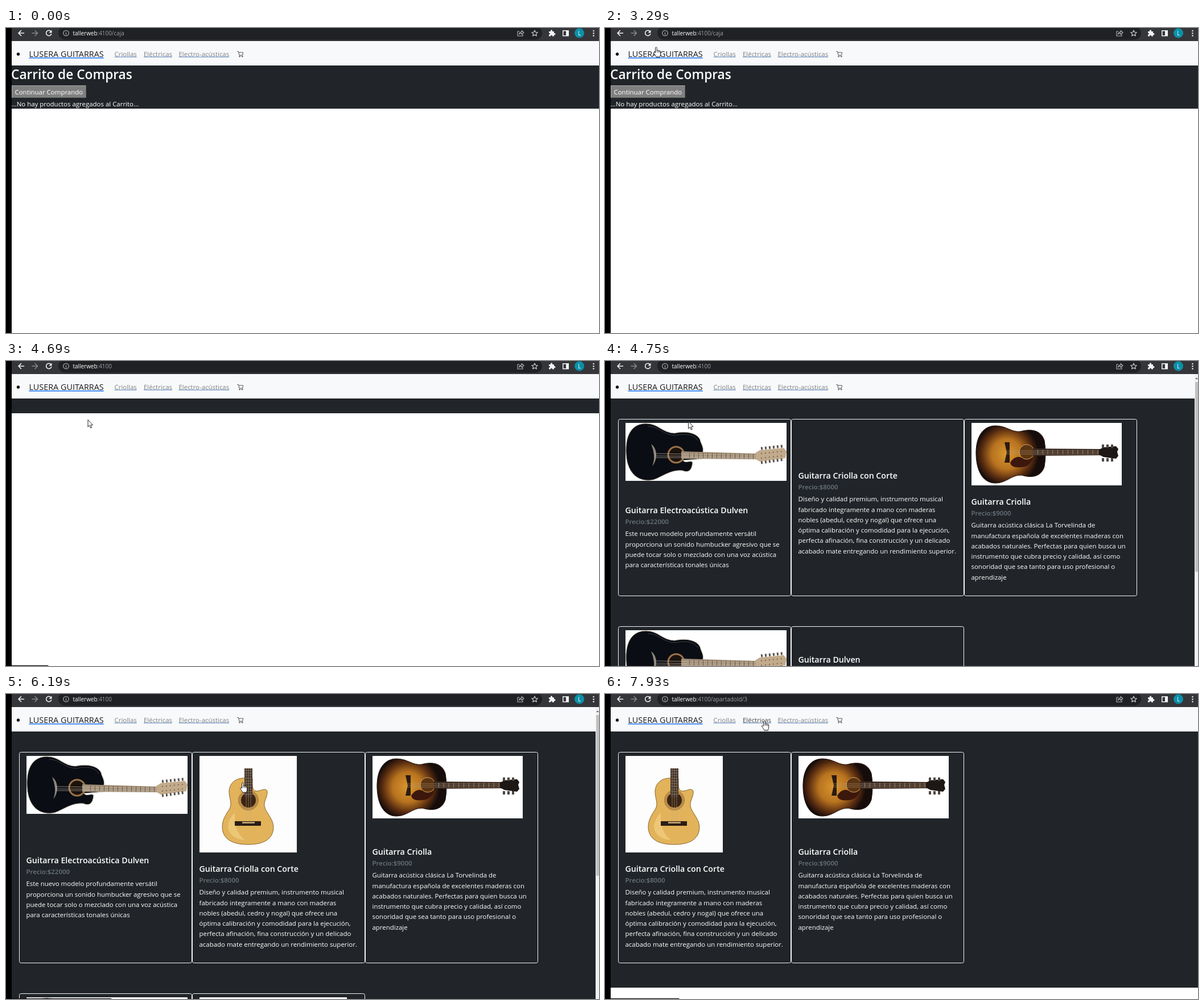
These frames come from a looping animation (1042 px wide and 537 px high, 8000 ms). An HTML page:

```html
<!DOCTYPE html>
<html lang="es">
<head>
<meta charset="utf-8">
<title>Carrito de compras</title>
<style>
html, body { margin: 0; width: 100%; height: 100%; overflow: hidden; background: #fff; }
svg { display: block; width: 100vw; height: 100vh; }
text { font: 11.44px "Open Sans", "Noto Sans", sans-serif; fill: #fff; white-space: pre; }
.url { font-size: 9.94px; }
.url tspan { fill: #9aa0a6; }
.brand { font-size: 14.4px; fill: #0d6efd; text-decoration: underline; }
.brand tspan { fill: #1a1c1e; }
.link { fill: #6d8fc4; text-decoration: underline; }
.link tspan { fill: #7f8184; }
.h2 { font-size: 22.7px; font-weight: 600; }
.h5 { font-size: 14.2px; font-weight: 600; }
.h6 { font-weight: 600; fill: #6c757d; }
.dark { fill: #212529; }
.line { fill: none; stroke-linecap: round; stroke-linejoin: round; }

/* One shared 8 s clock; 1% = 80 ms */
.a { animation: 8s step-end -2ms infinite; }
#cart, #urlCart { animation-name: cart; }
#wait { animation-name: wait; }
#homeA { animation-name: homeA; }
#homeB { animation-name: homeB; }
#bar { animation-name: bar; }
#category { animation-name: category; }
#urlHome { animation-name: urlHome; }
#urlCategory { animation-name: urlCategory; }
#brand { animation-name: brand; }
#criollas tspan { animation: criollas 8s step-end -2ms infinite; }
#electricas tspan { animation: electricas 8s step-end -2ms infinite; }
#status { animation-name: status; }
#cursor { animation-name: cursor; }
#arrow { animation-name: arrow; }
#hand { animation-name: hand; }

@keyframes cart { 0% { opacity: 1 } 46.125%, 100% { opacity: 0 } }
@keyframes wait { 0%, 59.375%, 100% { opacity: 0 } 46.125% { opacity: 1 } }
@keyframes homeA { 0%, 61.125%, 100% { opacity: 0 } 59.375% { opacity: 1 } }
@keyframes homeB { 0%, 95%, 100% { opacity: 0 } 61.125% { opacity: 1 } }
@keyframes bar { 0%, 95%, 100% { opacity: 0 } 59.375% { opacity: 1 } }
@keyframes category { 0% { opacity: 0 } 95%, 100% { opacity: 1 } }
@keyframes urlHome { 0%, 90%, 100% { opacity: 0 } 46.125% { opacity: 1 } }
@keyframes urlCategory { 0% { opacity: 0 } 90%, 100% { opacity: 1 } }
@keyframes brand { 0%, 57.75%, 100% { fill: #0d6efd } 39.5% { fill: #0a4fb8 } }
@keyframes criollas { 0%, 92.25%, 100% { fill: #7f8184 } 87.5% { fill: #45474a } }
@keyframes electricas { 0% { fill: #7f8184 } 92.25%, 100% { fill: #45474a } }
@keyframes status {
  0% { transform: translateX(-190px) }
  45.25% { transform: translateX(-111px) }
  59.375% { transform: translateX(-190px) }
  73.75% { transform: none }
  83% { transform: translateX(-22px) }
  84.875% { transform: translateX(-190px) }
  89.25%, 100% { transform: translateX(-55px) }
}
@keyframes cursor {
  0% { transform: translate(-50px, 0) }
  5.625% { transform: translate(964px, 511px); animation-timing-function: steps(7) }
  11.75% { transform: translate(9px, 212px) }
  18.375% { transform: translate(9.5px, 198px); animation-timing-function: steps(5) }
  24.25% { transform: translate(9px, 164px) }
  29.25% { transform: translate(9px, 143px); animation-timing-function: steps(4) }
  32.75% { transform: translate(9px, 58px) }
  35.25% { transform: translate(18px, 50px); animation-timing-function: steps(2) }
  37.5% { transform: translate(60px, 21px); animation-timing-function: steps(3) }
  41.125% { transform: translate(90px, 33.5px); animation-timing-function: steps(4) }
  45.25% { transform: translate(98px, 30px) }
  57.75% { transform: translate(130px, 88px) }
  58.625% { transform: translate(143.5px, 103px) }
  59.375% { transform: translate(146px, 106px) }
  61.125% { transform: translate(152px, 98px); animation-timing-function: steps(5) }
  65.625% { transform: translate(230px, 64px); animation-timing-function: steps(5) }
  70.5% { transform: translate(330px, 190px) }
  71.375% { transform: translate(346px, 198px); animation-timing-function: steps(6) }
  77.375% { transform: translate(416px, 156px) }
  80.5% { transform: translate(370px, 140px); animation-timing-function: steps(3) }
  83% { transform: translate(250px, 90px) }
  84.875% { transform: translate(238px, 78px); animation-timing-function: steps(3) }
  87.5% { transform: translate(212px, 46px) }
  91.25% { transform: translate(222px, 46px); animation-timing-function: steps(3) }
  93.875% { transform: translate(284px, 46px) }
  95.625% { transform: translate(290px, 47px) }
  99.125%, 100% { transform: translate(280px, 46.5px) }
}
@keyframes arrow {
  0%, 57.75%, 83%, 100% { opacity: 1 }
  39.5%, 71.375%, 87.5% { opacity: 0 }
  99.9% { opacity: 0 }
}
@keyframes hand {
  0%, 57.75%, 83%, 100% { opacity: 0 }
  39.5%, 71.375%, 87.5% { opacity: 1 }
  99.9% { opacity: 1 }
}
</style>
</head>
<body>
<svg viewBox="0 0 1042 537" preserveAspectRatio="none">
  <defs>
    <radialGradient id="burst" gradientUnits="userSpaceOnUse" cx="62" cy="55" r="66">
      <stop offset="0" stop-color="#d9972f"/>
      <stop offset=".4" stop-color="#b8731f"/>
      <stop offset=".68" stop-color="#552a10"/>
      <stop offset=".85" stop-color="#160c0a"/>
    </radialGradient>
    <g id="electro">
      <path fill="#fff" d="M0 0h283v102H0z"/>
      <path fill="#0b0d14" stroke="#cfc7b4" d="M1 55C-1 20 12 1 36 1C58 1 64 17 86 18C104 14 124 16 131 29C133 38 138 42 136 52V63L101 66C106 72 113 65 118 69C117 82 112 89 100 84C80 82 66 94 50 100C24 106 3 90 1 55Z"/>
      <path class="line" stroke="#3a3c44" d="M40 6C60 6 66 22 88 22C106 18 120 20 127 31"/>
      <circle cx="89" cy="56" r="14" fill="#1a120d" stroke="#9a7348" stroke-width="3"/>
      <path fill="#8d877d" d="M45 37Q54 44 54 56T47 76Q51 66 50 56T45 37Z"/>
      <path fill="#a08d76" d="M98 50L230 54V64L98 63Z"/>
      <path class="line" stroke="#d8d0c2" stroke-width=".6" d="M52 54L230 57M52 58L230 60M52 61L230 62"/>
      <path stroke="#6b5947" stroke-width="9" stroke-dasharray="1 7" d="M112 57L228 59"/>
      <path fill="#c2aa8b" d="M228 53L236 48L278 44L283 50L281 62L236 68L229 64Z"/>
      <path stroke="#5c5650" stroke-width="5" stroke-dasharray="3 4" d="M238 45L276 41M238 70L279 64"/>
      <path stroke="#77695a" stroke-width="2" stroke-dasharray="2 5" d="M238 54L276 50M238 62L276 58"/>
    </g>
    <g id="sunburst">
      <path fill="#fff" d="M0 0h264v110H0z"/>
      <path fill="url(#burst)" stroke="#1c1310" d="M8 56C7 22 22 5 42 5C62 5 70 17 86 15C104 10 122 12 128 31Q132 54 128 77C122 96 104 97 88 92C70 91 62 106 42 106C22 106 9 88 8 56Z"/>
      <path fill="#3c170c" d="M68 70Q78 54 92 63L108 62Q102 78 86 78Q70 80 68 70Z"/>
      <circle cx="97" cy="51" r="13" fill="#5a3413" stroke="#d3a45a"/>
      <path fill="#2b1a12" d="M58 34h9v36h-9l4-18z"/>
      <path fill="#3a2a22" d="M108 45L228 46V57L108 58Z"/>
      <path class="line" stroke="#b19572" stroke-width=".6" d="M62 49H228M62 52H228M62 55H228"/>
      <path stroke="#a89782" stroke-width="8" stroke-dasharray=".8 8" d="M116 51.5H226"/>
      <path fill="#1d1715" d="M224 47L232 43L254 41L258 46L256 51L258 58L254 63L232 60L224 56Z"/>
      <path stroke="#4b4541" stroke-width="6" stroke-dasharray="4 4" d="M229 41H252M229 65H252"/>
    </g>
    <g id="classic">
      <path fill="#fdfdfd" d="M0 0h171v170H0z"/>
      <path fill="#e2b35a" stroke="#8a6430" d="M79 39C64 39 53 47 52 62C52 76 58 82 53 93C46 104 40 112 40 126C41 148 60 156 85 156C111 156 129 148 130 126C130 110 116 100 114 88C113 78 120 72 119 62C116 55 108 62 100 62Q93 62 93 50V39Z"/>
      <path fill="#edc777" d="M62 100Q50 112 50 126Q54 146 80 148Q60 134 62 100Z"/>
      <circle cx="86" cy="78" r="15" fill="#3a2413" stroke="#b98a47" stroke-width="4"/>
      <circle cx="86" cy="78" r="17.5" fill="none" stroke="#5c4020" stroke-dasharray="1 1"/>
      <path fill="#40322b" d="M79 22h14v50q-7 3-14 0z"/>
      <path stroke="#8f8172" stroke-width="13" stroke-dasharray=".7 4" d="M86 25V70"/>
      <path class="line" stroke="#c8ad7d" stroke-width=".5" d="M82 22V116M86 22V116M90 22V116"/>
      <path fill="#2b1d15" d="M62 115h46v8H62z"/>
      <path fill="#b79c6d" d="M75 116h22v3H75z"/>
    </g>
    <path id="blank" fill="#fdfdfd" d="M0 0h259v100H0z"/>
  </defs>

  <rect width="1042" height="537" fill="#fff"/>

  <g id="cart" class="a">
    <rect class="dark" x="10" y="66" width="1032" height="76"/>
    <text class="h2" x="9" y="90">Carrito de Compras</text>
    <rect x="10" y="101" width="131" height="22" fill="#808080"/>
    <path class="line" stroke="#a5a5a5" d="M10.5 122V101.500H140"/>
    <path class="line" stroke="#686868" d="M11 122.500H140.500V102"/>
    <text x="15.500" y="117">Continuar Comprando</text>
    <text x="9.500" y="137.500">...No hay productos agregados al Carrito...</text>
  </g>
  <rect id="wait" class="a dark" x="10" y="66" width="1032" height="26"/>
  <g id="homeA" class="a"></g>
  <g id="homeB" class="a"></g>
  <g id="category" class="a"></g>

  <rect x="10" y="23" width="1032" height="43" fill="#f8f9fa"/>
  <circle cx="21.500" cy="46" r="2.700" fill="#111"/>
  <text id="brand" class="brand a" x="40.500" y="51"><tspan>LUSERA GUITARRAS</tspan></text>
  <text id="criollas" class="link" x="190.500" y="49.500"><tspan>Criollas</tspan></text>
  <text id="electricas" class="link" x="242" y="49.500"><tspan>Eléctricas</tspan></text>
  <text class="link" x="303.500" y="49.500"><tspan>Electro-acústicas</tspan></text>
  <g class="line" stroke="#55585b">
    <path d="M406.500 41.500H408.500L410 48H415.500L416.700 43H409"/>
    <circle cx="410.500" cy="50" r="1"/><circle cx="415" cy="50" r="1"/>
  </g>

  <g id="bar" class="a">
    <rect x="1036" y="23" width="6" height="514" fill="#f1f1f1"/>
    <path fill="#6a6a6a" d="M1037 32l2.500-3 2.500 3z"/>
    <rect id="thumb" x="1037" y="37" width="5" height="283" fill="#c1c1c1"/>
  </g>

  <rect x="10" width="1032" height="23" fill="#35363a"/>
  <rect x="92" y="-3" width="850" height="23.500" rx="11.700" fill="#202124"/>
  <g class="line" stroke="#f1f3f4" stroke-width="1.600">
    <path d="M31.500 9H22M26.500 4.500L22 9l4.500 4.500"/>
    <path stroke="#86888c" d="M46 9h9.500M51 4.500L55.500 9 51 13.500"/>
    <path d="M79 6A4.700 4.700 0 1 0 79.700 10.500"/>
    <path fill="#f1f3f4" stroke="none" d="M80.500 3.500V8.500H75.500Z"/>
  </g>
  <g class="line" stroke="#b4b7bb" stroke-width="1.100">
    <circle cx="105.500" cy="9" r="4.800"/><path d="M105.500 8.500V11.500M105.500 6.500V6.600"/>
    <path d="M902 6H899V14H908V11.500M901.500 11Q902.500 7 906 7V4.500L910 8L906 11.200V9Q903 9 901.500 11Z"/>
    <path stroke="#d5d7da" d="M929 4l1.500 3.500 3.700.3-2.800 2.500.9 3.700-3.300-2-3.300 2 .9-3.700-2.800-2.500 3.700-.3z"/>
  </g>
  <path fill="#f1f3f4" d="M954 6h3q-.5-2.800 1.500-2.800T960 6h3v3q2.500-.4 2.500 1.600T963 12v2.500h-3q0-2-1.500-2T957 14.500H954V11.500q2 0 2-1.500T954 8.500Z"/>
  <path fill="#f1f3f4" fill-rule="evenodd" d="M978 4h11v10.500h-11zM979.500 5.500v7.500h4.500V5.500z"/>
  <circle cx="1007.500" cy="9" r="8.500" fill="#0b91a8"/>
  <text class="url" x="1007.500" y="12.500" text-anchor="middle">L</text>
  <g fill="#e3e5e8"><circle cx="1032.500" cy="5" r="1.300"/><circle cx="1032.500" cy="9.300" r="1.300"/><circle cx="1032.500" cy="13.600" r="1.300"/></g>
  <text id="urlCart" class="url a" x="117.500" y="13">tallerweb<tspan>:4100/caja</tspan></text>
  <text id="urlHome" class="url a" x="117.500" y="13">tallerweb<tspan>:4100</tspan></text>
  <text id="urlCategory" class="url a" x="117.500" y="13">tallerweb<tspan>:4100/apartadoId/3</tspan></text>

  <rect id="status" class="a" x="-10" y="535.800" width="196" height="4" rx="2" fill="#111214"/>

  <g id="cursor" class="a" fill="#fff" stroke="#111" stroke-width=".9" stroke-linejoin="round">
    <path id="arrow" class="a" d="M.5.5V13L3.300 10.400 5.200 15 7.200 14.200 5.300 9.700H9Z"/>
    <g id="hand" class="a">
      <path d="M-1.500 10V1.500Q-1.500.3-.2.3T1.200 1.500V6Q2.500 5 3.600 6.300Q5 5.500 5.900 7Q7.500 6.600 7.700 8.300V12Q7.500 14 6.500 17.200H-.3Q-1 15-4.200 11Q-5 9.300-3.800 9T-1.500 10Z"/>
      <path class="line" d="M1.200 6V9M3.600 6.500V9M5.900 7.200V9.500" stroke-width=".8"/>
    </g>
  </g>
  <rect width="10" height="537"/>
</svg>
<script>
const electro = {
  img: "electro", title: "Guitarra Electroacústica Dulven", price: 22000,
  lines: ["Este nuevo modelo profundamente versátil", "proporciona un sonido humbucker agresivo que se",
    "puede tocar solo o mezclado con una voz acústica", "para características tonales únicas"]
};
const cutaway = {
  img: "classic", title: "Guitarra Criolla con Corte", price: 8000,
  lines: ["Diseño y calidad premium, instrumento musical", "fabricado integramente a mano con maderas",
    "nobles (abedul, cedro y nogal) que ofrece una", "óptima calibración y comodidad para la ejecución,",
    "perfecta afinación, fina construcción y un delicado", "acabado mate entregando un rendimiento superior."]
};
const criolla = {
  img: "sunburst", title: "Guitarra Criolla", price: 9000,
  lines: ["Guitarra acústica clásica La Torvelinda de", "manufactura española de excelentes maderas con",
    "acabados naturales. Perfectas para quien busca un", "instrumento que cubra precio y calidad, así como",
    "sonoridad que sea tanto para uso profesional o", "aprendizaje"]
};
const dulven = { img: "blank", title: "Guitarra Dulven", price: 15000, lines: [] };

const text = (x, y, s, cls = "") => `<text class="${cls}" x="${x}" y="${y}">${s}</text>`;

// mid is the vertical centre of the title
function card(col, top, height, mid, item, loaded = true) {
  const left = 23 + col * 304, x = left + 12.5;
  return `<rect x="${left + .5}" y="${top + .5}" width="303" height="${height - 1}" rx="3" fill="none" stroke="#f4f5f6"/>` +
    (loaded ? `<use href="#${item.img}" x="${left + 13}" y="${top + 7}"/>` : "") +
    text(x, mid + 5, item.title, "h5") +
    text(x, mid + 23.5, "Precio:$" + item.price, "h6") +
    item.lines.map((s, i) => text(x, mid + 45.3 + i * 18.25, s)).join("");
}

function page(id, height, ...cards) {
  document.getElementById(id).innerHTML =
    `<rect class="dark" x="10" y="66" width="1032" height="${height}"/>` + cards.join("");
}

page("homeA", 471,
  card(0, 102, 312, 263, electro), card(1, 102, 312, 202, cutaway, false), card(2, 102, 312, 248, criolla),
  card(0, 467, 312, 628, electro), card(1, 467, 312, 526, dulven, false),
  `<rect x="1037" y="37" width="5" height="334"/>`);
page("homeB", 471,
  card(0, 102, 372, 293, electro), card(1, 102, 372, 308, cutaway), card(2, 102, 372, 278, criolla),
  card(0, 527, 312, 690, electro), card(1, 527, 312, 690, dulven));
page("category", 451,
  card(0, 102, 372, 308, cutaway), card(1, 102, 372, 278, criolla));

// The scroll thumb is longer until the last picture has loaded
document.getElementById("thumb").animate(
  [{ height: "334px", easing: "step-end" }, { height: "334px", offset: .61125, easing: "step-end" },
   { height: "283px", offset: .61125, easing: "step-end" }, { height: "283px" }],
  { duration: 8000, delay: -2, iterations: Infinity });
</script>
</body>
</html>
```
